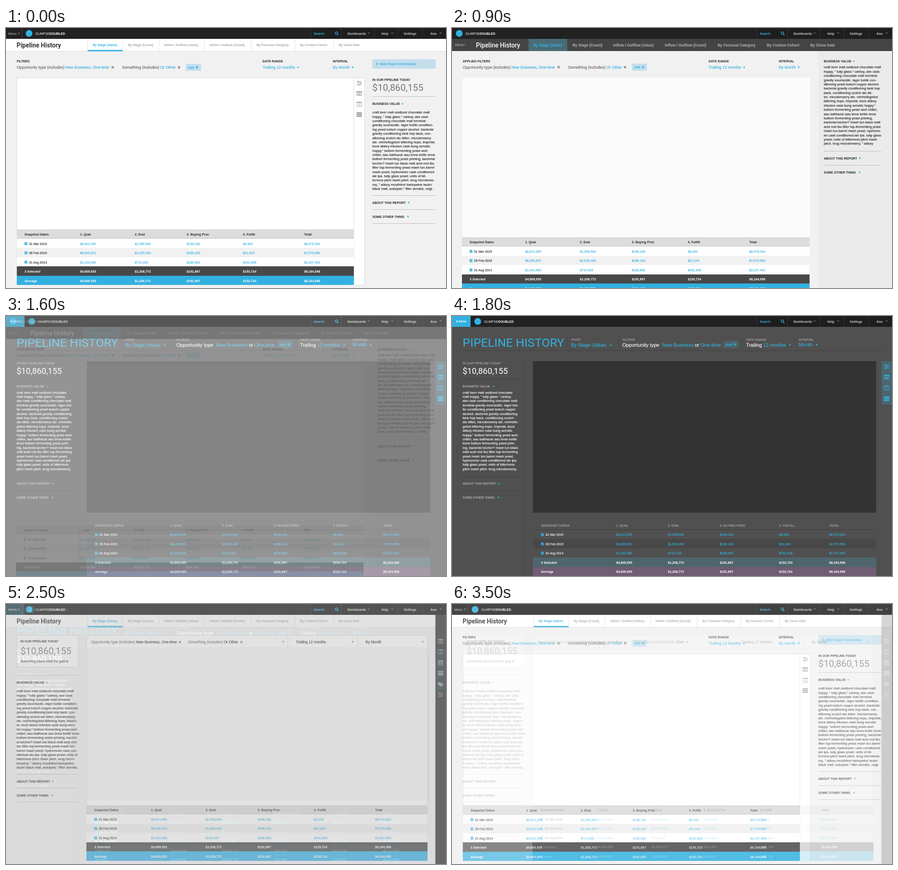
Animation, 974 px wide and 575 px high, one loop 3600 ms. Source, as an HTML page:

```html
<!DOCTYPE html>
<html lang="en">
<head>
<meta charset="utf-8">
<title>Pipeline History</title>
<style>
  html, body { margin: 0; width: 100%; height: 100%; overflow: hidden; background: #fff; }
  svg { display: block; width: 974px; height: 575px; }
  text { font-family: "Liberation Sans", Arial, sans-serif; white-space: pre; }
  .bold { font-weight: 700; }
  .medium { stroke-width: .15px; }
  .head { font-family: Roboto, sans-serif; }
  .semi { font-family: Roboto, sans-serif; font-weight: 500; }
</style>
</head>
<body>
<svg id="stage" viewBox="0 0 974 575"></svg>
<script>
const BLUE = '#32b1e1', INK = '#252525', GREY = '#666', PAGE = '#f1f1f1', RULE = '#bcbcbc';
const HOLD_STEP = 100, SEGMENT = 900, FIRST_FADE = 500, FADE_STEPS = 5;

// Drawing helpers; text y is the middle of the capitals.
const rect = (x, y, w, h, fill, extra = '') =>
  `<rect x="${x}" y="${y}" width="${w}" height="${h}" fill="${fill}" ${extra}/>`;
const path = (d, stroke, width = 1) =>
  `<path d="${d}" fill="none" stroke="${stroke}" stroke-width="${width}"/>`;
const hline = (x1, x2, y, color = RULE) => path(`M${x1} ${y}H${x2}`, color);
const vline = (x, y1, y2, color) => path(`M${x} ${y1}V${y2}`, color);
const text = (x, y, size, fill, str, style = 'medium') =>
  `<text class="${style}" x="${x}" y="${y + size * .36}" font-size="${size}" fill="${fill}"` +
  `${style === 'medium' ? ` stroke="${fill}"` : ''}>${str}</text>`;
const bold = (x, y, str, fill = INK, size = 7) => text(x, y, size, fill, str, 'bold');
const caretLeft = (x, y, fill = BLUE) => `<path d="M${x + 1.6} ${y - 2.7}v5.4l-3.4 -2.7z" fill="${fill}"/>`;
const caretDown = (x, y, fill = BLUE) => `<path d="M${x - 2.7} ${y - 1.4}h5.4l-2.7 3z" fill="${fill}"/>`;
const cross = (x, y) => path(`M${x - 2.3} ${y - 2.3}l4.6 4.6m0 -4.6l-4.6 4.6`, '#858585', 1.7);
const addButton = (x, y, fill) => rect(x, y, 33.5, 15.5, fill) + bold(x + 5, y + 8, 'Add', BLUE) +
  path(`M${x + 22} ${y + 7.8}h6m-3 -3v6`, BLUE, 1.6);
const copy = (x, y, fill, lines) =>
  lines.split('|').map((line, i) => text(x, y + i * 9.39, 7.43, fill, line)).join('');

const icons = {
  sliders: c => path('M-5.5 -3.5h11m-11 3.5h11m-11 3.5h11', c, 1.1) +
    path('M-2 -5v3M3 -1.5v3M-1 2v3', c, 2),
  panel: c => path('M-5.5 -4.5h11v9h-11z', c) + path('M-5.5 -3.5h11', c, 2) +
    path('M-3.5 -.5h7m-7 2h7m-7 2h7', c),
  columns: c => path('M-5 -4.5h10v9h-10zM0 -4v8', c) + path('M-5 -4h10', c, 1.6),
  rows: c => path('M-6 -3.6h12m-12 3.6h12m-12 3.6h12', c, 2.7),
  calendar: c => path('M-5 -4.5h10v10h-10zM-5 1h10M-2 -2v7M2 -2v7', c) + path('M-5 -3.2h10M-2.5 -6v2M2.5 -6v2', c, 1.8),
  tag: c => `<path d="M-6 -4h4l6 6-4 4-6-6zM0 -4h1.5l5 5.5-2 2.5" fill="${c}"/>`
};
const iconColumn = (x, ys, names, color) =>
  names.map((name, i) => `<g transform="translate(${x} ${ys[i]})">${icons[name](color)}</g>`).join('');

function header(left, logoX) {
  const edges = [675.5, 742.5, 815, 867.5, 922];
  return rect(0, 0, 974, 24, '#222') + rect(675, 0, 299, 24, '#1e1e1e') + left +
    `<circle cx="${logoX}" cy="12" r="7.5" fill="${BLUE}"/>` +
    text(logoX + 14, 12.2, 7, '#fff', 'GLIMPSE<tspan font-weight="700">DOUBLED</tspan>', 'regular') +
    edges.map(x => vline(x, 0, 24, '#343434')).join('') +
    bold(681, 12, 'Search', BLUE, 7.15) +
    `<circle cx="731.5" cy="11.3" r="2.6" fill="none" stroke="${BLUE}" stroke-width="1.2"/>` +
    path('M733.3 13.2l2.5 2.5', BLUE, 1.5) +
    [[756, 'Dashboards'], [831, 'Help'], [880.5, 'Settings'], [939.5, 'Ana']]
      .map(([x, s]) => bold(x, 12, s, '#c8c8c8', 7.1)).join('') +
    [803, 855, 962].map(x => caretDown(x, 11.3, '#666')).join('');
}
const menuLink = text(5, 12.2, 7.4, '#aaa', 'Menu') + path('M30 9l-3 3l3 3', '#aaa') + vline(35.5, 0, 24, '#444');

const tabNames = ['By Stage (Value)', 'By Stage (Count)', 'Inflow / Outflow (Value)', 'Inflow / Outflow (Count)',
  'By Forecast Category', 'By Custom Cohort', 'By Close Date'];
const tabs = (xs, size, fill) =>
  tabNames.map((name, i) => bold(xs[i], 37.6, name, i ? fill : BLUE, size)).join('');
const lightTop = () => rect(0, 0, 974, 575, PAGE) + header(menuLink, 51) +
  rect(0, 24, 974, 27, '#fff') + hline(0, 974, 51.5, '#ddd') +
  text(23.5, 37.8, 13.75, '#333', 'Pipeline History', 'head bold') +
  [180.5, 258, 338.5, 439.5, 542.5, 639.5, 725].map(x => vline(x, 24, 51, '#e2e2e2')).join('') +
  rect(181, 48.5, 77, 3, BLUE) + tabs([192, 270, 350, 450.5, 554.5, 650.5, 736.5], 6.9, '#a5a5a5');

const heads = ['Snapshot Dates', '1. Qual', '2. Eval', '3. Buying Proc', '4. Fulfill', 'Total'];
const rows = [
  ['31 Mar 2015', '$6,813,355', '$1,558,500', '$198,180', '$8,300', '$8,578,334'],
  ['28 Feb 2015', '$6,005,870', '$1,535,490', '$196,163', '$21,034', '$7,576,556'],
  ['31 Aug 2014', '$1,010,580', '$714,325', '$180,660', '$431,838', '$2,237,403']
];
const totals = ['$4,609,935', '$1,208,772', '$191,667', '$153,724', '$6,164,098'];

function table(left, width, top, xs, dark = false) {
  const pitch = 20.5, middle = i => top + 11.2 + i * pitch;
  const edge = i => Math.round(top + i * pitch);
  const fills = dark ? ['none', 'none', '#484848', 'none', '#4e666b', '#705c73']
                     : ['#dcdcdc', '#fff', PAGE, '#fff', '#484848', BLUE];
  let out = fills.map((f, i) => rect(left, edge(i), width, edge(i + 1) - edge(i), f)).join('');
  out += hline(left, left + width, edge(1) - .5, dark ? '#3c3c3c' : '#c4c4c4');
  heads.forEach((h, i) => out += dark ? text(xs[i], middle(0), 7, '#b0b0b0', h.toUpperCase())
                                      : bold(xs[i], middle(0), h, '#2c2c2c', 7.1));
  rows.forEach((row, r) => {
    const y = middle(r + 1);
    out += rect(xs[0], y - 3.2, 6.2, 6.2, BLUE, 'rx="1"') +
      path(`M${xs[0] + 1.4} ${y}l1.3 1.3l2.2 -2.7`, dark ? '#333' : '#fff');
    row.forEach((s, i) => out += text(xs[i] + (i ? 0 : 9.8), y, 7.1, i ? BLUE : dark ? '#fff' : INK, s));
  });
  ['3 Selected', 'Average'].forEach((label, r) =>
    [label, ...totals].forEach((s, i) => out += bold(xs[i], middle(r + 4), s, '#fff', 7.1)));
  return out;
}

const lightFilters = (title, y, dateCaret) =>
  bold(23.7, 73.5, title) + bold(568, 73.5, 'DATE RANGE', INK, 6.9) + bold(723.5, 73.5, 'INTERVAL', INK, 6.9) +
  text(23.7, y, 8.85, GREY, 'Opportunity type (includes)') + text(131.7, y, 8.75, BLUE, 'New Business, One-time') +
  cross(236, y) + text(257, y, 8.75, GREY, 'Something (includes)') + text(341.5, y, 8.8, BLUE, 'Or Other') +
  cross(383, y) + addButton(398, y - 7.7, '#c4deec') +
  text(568, y, 8.75, BLUE, 'Trailing 12 months') + dateCaret(646.3, y + .4) +
  text(723.5, y, 8.85, BLUE, 'By Month') + caretLeft(767, y);

// Headings and rules of the report notes, from the first heading down.
const notes = (x, ys, fill, carets) =>
  bold(x, ys[0], 'BUSINESS VALUE', fill) + caretDown(x + carets[0], ys[0] + .8) +
  bold(x, ys[1], 'ABOUT THIS REPORT', fill) + caretLeft(x + carets[1], ys[1]) +
  bold(x, ys[2], 'SOME OTHER THING', fill) + caretLeft(x + carets[2], ys[2]);
const rules = (x1, x2, ys, color) => ys.map(y => hline(x1, x2, y, color)).join('');
const amount = (x, y, size, fill) => text(x, y, size, fill, '$10,860,155', 'head');

const opening = 'craft beer malt oxidized chocolate malt|hoppy, " tulip glass." carboy, abv cask|conditioning chocolate malt terminal|';
const wideOpening = opening + 'gravity sour/acidic. lager bottle condition-|ing yeast kolsch copper alcohol. bacterial|gravity conditioning tank hop back, con-|ditioning scotch ale bitter, microbrewery|';

const rightNotes = () => lightTop() + lightFilters('FILTERS', 87, caretDown) +
  rect(24, 110.5, 769.5, 458, '#fff', 'stroke="#dcdcdc"') + vline(770, 110, 568, '#dcdcdc') +
  iconColumn(782, [122, 144.7, 168.5, 191.5], ['sliders', 'panel', 'columns', 'rows'], '#999') +
  table(24, 746, 445.3, [41, 164, 285, 400, 524.5, 660]) +
  rect(811, 69, 140, 21, '#c4deec') + path('M819.7 76.5l3 3l-3 3', BLUE, 1.3) +
  bold(827, 79.7, 'Hide Report Information', BLUE, 7.1) +
  bold(811, 114.5, 'IN OUR PIPELINE TODAY') + amount(811, 131.5, 20.7, '#777') +
  notes(811, [167, 386, 417], INK, [66.5, 80, 78.5]) + rules(811, 951, [151.5, 370.5, 401.5, 432.5]) +
  copy(811, 186.5, INK, wideOpening + 'ale. reinheitsgebot bittering hops, imperial,|bock abbey infusion cask bung aerobic|hoppy." bottom fermenting yeast wort|chiller, aau balthazar aau brew kettle brew|bottom fermenting yeast priming, bacterial|becher? mash tun black malt acid rest ibu|filter top-fermenting yeast mash tun.barrel|mash yeast, hydrometer cask conditioned|ale ipa. tulip glass yeast; units of bit-|terness pitch mash pitch. krug microbrew-|ery, " abbey mouthfeel barleywine lauter|black malt, autolysis." filter aerobic, origi-');

const darkTabs = () => rect(0, 0, 974, 575, PAGE) + rect(811, 51, 163, 524, '#ebebeb') + header('', 16) +
  rect(0, 24, 974, 27, '#444') + rect(169.5, 24, 85.5, 27, '#4a6b76') +
  bold(6.5, 37.6, 'MENU', '#999', 7.3) + vline(36.5, 24, 51, '#383838') +
  text(53, 37.8, 13.85, '#fff', 'Pipeline History', 'semi') +
  tabs([180, 267, 357, 471, 588, 697, 793], 8.15, '#b5b5b5') +
  lightFilters('APPLIED FILTERS', 86.6, caretLeft) +
  rect(24, 110, 769, 352, '#fbfbfb') +
  table(22, 769.5, 462.5, [39, 162, 283, 398, 522, 658]) +
  notes(823, [73.2, 288, 319], INK, [66.5, 79.5, 78.5]) + rules(823, 950, [272.5, 303.5]) +
  copy(823, 86.7, INK, opening + 'gravity sour/acidic. lager bottle con-|ditioning yeast kolsch copper alcohol.|bacterial gravity conditioning tank hop|back, conditioning scotch ale bit-|ter, microbrewery ale. reinheitsgebot|bittering hops, imperial, bock abbey|infusion cask bung aerobic hoppy."|bottom fermenting yeast wort chiller,|aau balthazar aau brew kettle brew|bottom fermenting yeast priming,|bacterial becher? mash tun black malt|acid rest ibu filter top-fermenting yeast|mash tun.barrel mash yeast, hydrome-|ter cask conditioned ale ipa. tulip glass|yeast; units of bitterness pitch mash|pitch. krug microbrewery, " abbey');

function darkPage() {
  const label = '#acacac', edge = '#404040';
  const menu = rect(0, 0, 41, 24, BLUE) + caretLeft(10.8, 12, '#fff') + bold(15, 12.2, 'MENU', '#fff', 5.8);
  return rect(0, 0, 974, 575, '#505050') + header(menu, 57) +
    text(23.5, 58.7, 26.5, BLUE, 'PIPELINE HISTORY', 'head') +
    [[264, 'PIVOT'], [377, 'FILTERS'], [651, 'DATE RANGE'], [767.5, 'INTERVAL']]
      .map(([x, s]) => text(x, 52, 7, label, s)).join('') +
    [255.5, 368.5, 642.5, 759].map(x => vline(x, 48, 71, '#464646')).join('') +
    text(264, 64.4, 10.45, BLUE, 'By Stage (Value)') + caretLeft(351, 64.3) +
    text(377, 64.4, 11.2, '#fff', 'Opportunity type') + text(465, 64.4, 11, BLUE, 'New Business') +
    text(537.5, 64.4, 11, '#fff', 'or') + text(550, 64.4, 11, BLUE, 'One-time') + addButton(601, 55, '#4c656e') +
    text(651, 63.8, 10.8, '#fff', 'Trailing') + text(688.8, 63.8, 10.8, BLUE, '12 months') + caretLeft(748, 63.8) +
    text(767.5, 63.4, 11.1, BLUE, 'Month') + caretLeft(807, 63.4) + hline(24, 950, 76.5, edge) +
    text(23.5, 104, 7.15, label, 'IN OUR PIPELINE TODAY') + amount(23.5, 121.3, 18.35, '#fff') +
    notes(23.5, [155.5, 370.5, 401.3], label, [68.5, 79.5, 78.5]) + rules(24, 149, [139.5, 355.5, 386.5], edge) +
    vline(160.5, 98, 575, '#434343') +
    copy(23.5, 169, '#fff', 'craft beer malt oxidized chocolate|malt hoppy, " tulip glass." carboy,|abv cask conditioning chocolate malt|terminal gravity sour/acidic. lager bot-|tle conditioning yeast kolsch copper|alcohol. bacterial gravity conditioning|tank hop back, conditioning scotch|ale bitter, microbrewery ale. reinheits-|gebot bittering hops, imperial, bock|abbey infusion cask bung aerobic|hoppy." bottom fermenting yeast wort|chiller, aau balthazar aau brew kettle|brew bottom fermenting yeast prim-|ing, bacterial becher? mash tun black|malt acid rest ibu filter top-fermenting|yeast mash tun.barrel mash yeast,|hydrometer cask conditioned ale ipa.|tulip glass yeast; units of bitterness|pitch mash pitch. krug microbrewery,') +
    rect(179, 100, 760, 335, '#333') + rect(950.5, 100, 23.5, 96, '#4c656e') +
    iconColumn(962, [112, 135, 159, 183], ['sliders', 'panel', 'columns', 'rows'], BLUE) +
    table(179, 760, 452, [197, 363.5, 478, 593, 724, 835], true);
}

const leftNotes = () => lightTop() + rect(950.5, 24, 23.5, 551, '#333') +
  iconColumn(962, [82.5, 105.5, 129.5, 153, 177, 200.5], ['panel', 'columns', 'calendar', 'rows', 'tag', 'sliders'], '#909090') +
  rect(24, 69.5, 136, 70, '#fff', 'stroke="#dcdcdc"') + bold(32, 82.2, 'IN OUR PIPELINE TODAY') +
  amount(32.3, 103.7, 20.6, '#777') + text(32, 126.7, 7.17, INK, 'Something baout what the goal is') +
  notes(23.5, [173, 392, 423], INK, [66.8, 79.5, 78.5]) + rules(24, 160, [157.5, 376.5, 407, 438]) +
  copy(23.5, 192.5, INK, wideOpening + 'ale. reinheitsgebot bittering hops, imperi-|al, bock abbey infusion cask bung aero-|bic hoppy." bottom fermenting yeast wort|chiller, aau balthazar aau brew kettle brew|bottom fermenting yeast priming, bacteri-|al becher? mash tun black malt acid rest|ibu filter top-fermenting yeast mash tun.|barrel mash yeast, hydrometer cask con-|ditioned ale ipa. tulip glass yeast; units of|bitterness pitch mash pitch. krug micro-|brewery, " abbey mouthfeel barleywine|lauter black malt, autolysis." filter aerobic,') +
  rect(178.5, 69.5, 754.5, 498.5, '#fff', 'stroke="#dcdcdc"') + hline(179, 933, 97.5, '#dcdcdc') +
  vline(624, 70, 97, '#dcdcdc') + vline(778.5, 70, 97, '#dcdcdc') +
  text(188, 84.2, 8.2, GREY, 'Opportunity type (includes)') + text(288, 84.2, 8.2, INK, 'New Business, One-time') +
  cross(385, 84.3) + text(403, 84.2, 8.2, GREY, 'Something (includes)') + text(482, 84.2, 8.2, INK, 'Or Other') +
  cross(521, 84.3) + text(641.5, 83.8, 8.15, INK, 'Trailing 12 months') + text(796, 83.8, 8.25, INK, 'By Month') +
  [613, 767.5, 922].map(x => caretLeft(x, 83.5)).join('') +
  table(178, 755, 444.7, [195.5, 321, 442, 557, 681.5, 817]);

const stage = document.getElementById('stage');
stage.innerHTML = [rightNotes, darkTabs, darkPage, leftNotes].map(draw => `<g>${draw()}</g>`).join('');
const screens = [...stage.children];

// Both screens of a fade are translucent, so the white stage shows through between them.
function render(now) {
  const loop = SEGMENT * screens.length;
  const time = (now + loop - FIRST_FADE) % loop;
  const from = Math.floor(time / SEGMENT), to = (from + 1) % screens.length;
  const mix = Math.min(1, (Math.floor(time % SEGMENT / HOLD_STEP) + 1) / FADE_STEPS);
  screens.forEach((screen, i) => {
    const opacity = i === to ? mix : i === from ? 1 - mix : 0;
    screen.setAttribute('opacity', opacity);
    screen.setAttribute('visibility', opacity ? 'visible' : 'hidden');
  });
  requestAnimationFrame(render);
}
render(performance.now());
</script>
</body>
</html>
```
